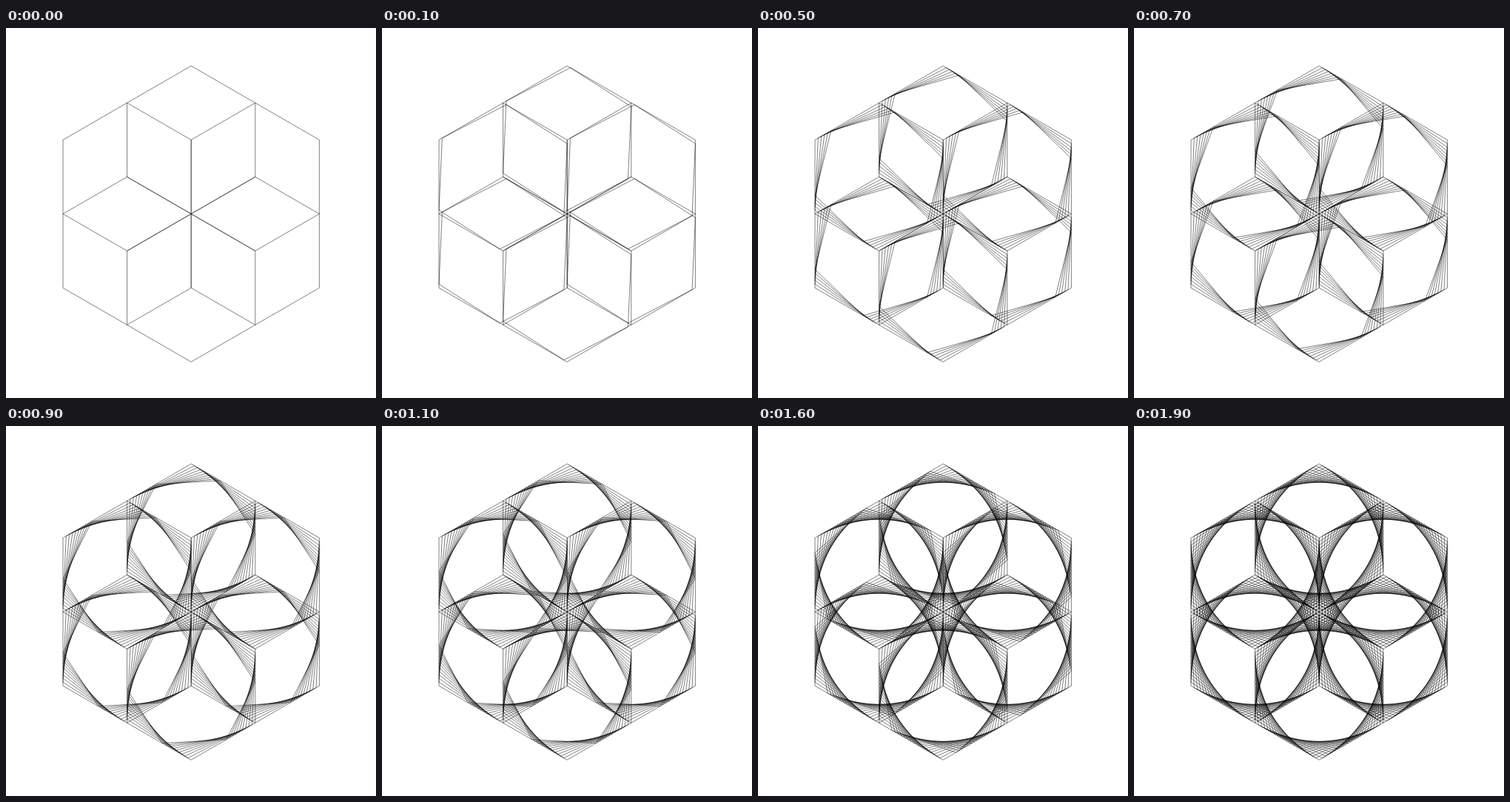
Write an HTML page with a canvas that moves like this. It is 500x500 px and loops after 2000 ms.

```html
<!DOCTYPE html>
<html lang="en">
<head>
<meta charset="utf-8">
<title>Hexagon string art</title>
<style>
  html, body { margin: 0; width: 100%; height: 100%; overflow: hidden; background: #fff; }
  canvas { display: block; }
</style>
</head>
<body>
<canvas width="500" height="500"></canvas>
<script>
const ctx = document.querySelector('canvas').getContext('2d');
const CENTER = { x: 250.2, y: 251.2 };
const RADIUS = 100;
const STEPS = 20;
const STEP_MS = 100;

// Corner k of a pointy-top hexagon, counted clockwise from the top.
function corner(center, k) {
  const angle = (k * 60 - 90) * Math.PI / 180;
  return {
    x: center.x + RADIUS * Math.cos(angle),
    y: center.y + RADIUS * Math.sin(angle)
  };
}

// Hexagon whose corners have slid the fraction t along the edges.
function strokeHexagon(center, t) {
  ctx.beginPath();
  for (let k = 0; k < 6; k++) {
    const a = corner(center, k);
    const b = corner(center, k + 1);
    ctx.lineTo(a.x + (b.x - a.x) * t, a.y + (b.y - a.y) * t);
  }
  ctx.closePath();
  ctx.stroke();
}

function draw(now) {
  const lastStep = Math.floor(now / STEP_MS) % STEPS;
  ctx.fillStyle = '#fff';
  ctx.fillRect(0, 0, 500, 500);
  ctx.strokeStyle = '#000';
  ctx.lineWidth = 0.5;
  for (let step = 0; step <= lastStep; step++) {
    for (let k = 0; k < 6; k++) strokeHexagon(corner(CENTER, k), step / STEPS);
  }
}

const start = performance.now();
function tick() {
  draw(performance.now() - start);
  requestAnimationFrame(tick);
}
tick();
</script>
</body>
</html>
```
